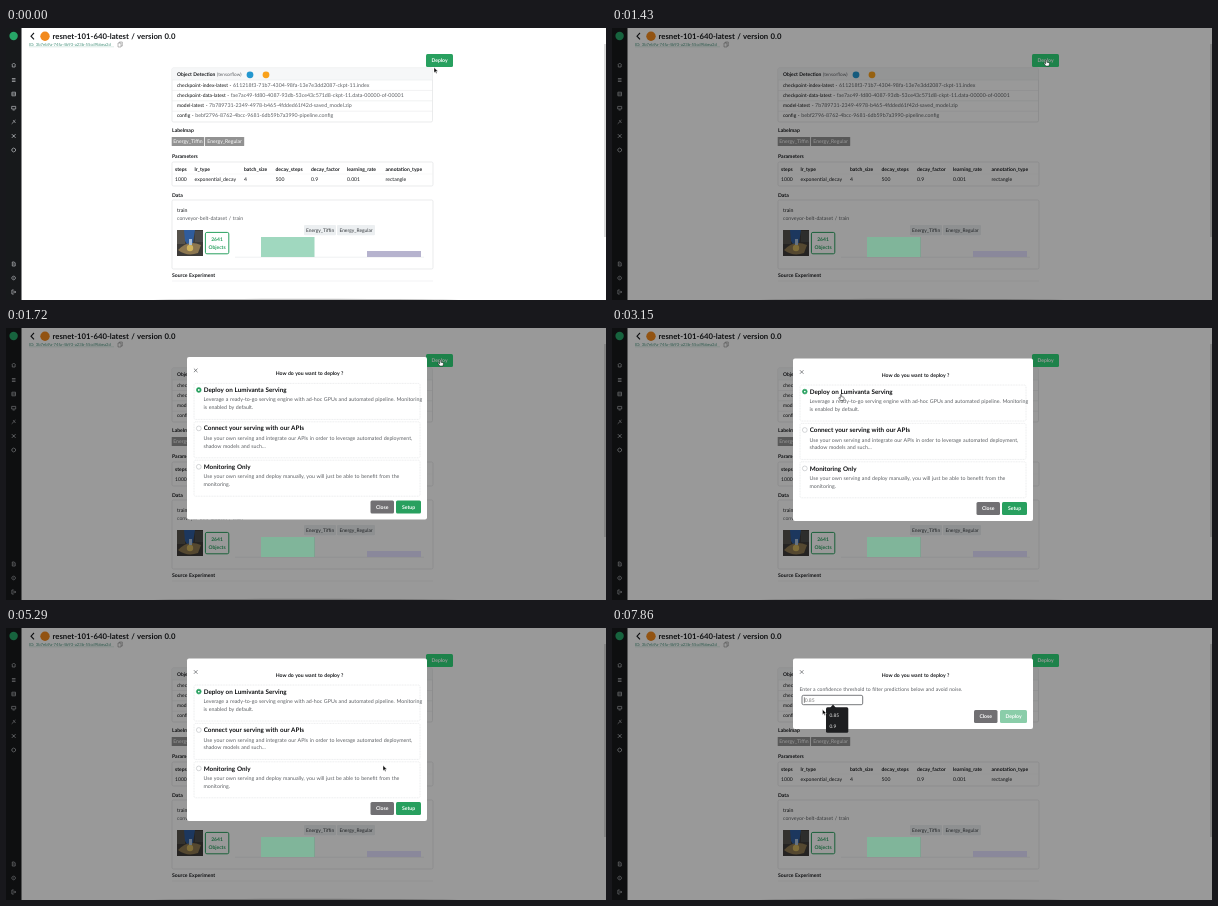
An HTML page that plays this animation: 600 px wide and 272 px high, repeating every 8000 ms.

```html
<!DOCTYPE html>
<html lang="en">
<head>
<meta charset="utf-8">
<title>Model deployment</title>
<style>
  html, body { margin: 0; width: 100%; height: 100%; overflow: hidden; background: #fff; }
  svg { display: block; width: 100vw; height: 100vh; }
  text {
    font-family: Lato, "Open Sans", sans-serif; word-spacing: .06em;
    white-space: pre; text-rendering: geometricPrecision;
  }
  .b { font-weight: 700; }
</style>
</head>
<body>
<svg id="stage" viewBox="0 0 600 272"></svg>
<script>
const GREEN = '#28a05f', DARK_GREEN = '#218a4f', PALE_GREEN = '#8acda9', VIVID_GREEN = '#30d87b';
const INK = '#16181b', GREY = '#5c5f63';
const STEPS = 56, LOOP = 8000;

const rect = (x, y, w, h, fill, more = '') =>
  `<rect x="${x}" y="${y}" width="${w}" height="${h}" fill="${fill}" ${more}/>`;
const disc = (x, y, r, fill, more = '') =>
  `<circle cx="${x}" cy="${y}" r="${r}" fill="${fill}" ${more}/>`;
const path = (d, stroke, width = .7, fill = 'none', more = '') =>
  `<path d="${d}" stroke="${stroke}" stroke-width="${width}" fill="${fill}" ${more}/>`;
const text = (x, y, size, str, fill = INK, more = '') =>
  `<text x="${x}" y="${y}" font-size="${size}" fill="${fill}" ${more}>${str}</text>`;
const bold = (x, y, size, str, fill = INK, more = '') =>
  text(x, y, size, str, fill, `class="b" ${more}`);
const group = (id, body, more = '') => `<g id="${id}" ${more}>${body}</g>`;
const card = (x, y, w, h) =>
  rect(x, y, w, h, '#fff', 'rx="1.5" stroke="#dcdee0" stroke-width=".6"');
const button = (x, y, w, label, fill, id = '') =>
  rect(x, y, w, 13, fill, `rx="1.5" ${id && `id="${id}"`}`) +
  bold(x + w / 2, y + 8.4, 5.1, label, '#fff', 'text-anchor="middle"');

function sidebar() {
  const c = '#a5a8ab';
  const icons = [
    [37, 'M-2 0L0 -2L2 0M-1.4 0V2H1.4V0'],
    [52, 'M-1.8 -1.5H1.8M-1.8 0H1.8M-1.8 1.5H1.8'],
    [66, 'M-1.8 -1.8H1.8V1.8H-1.8ZM-1.8 0H1.8'],
    [80, 'M-2 -1.6H2V1H-2ZM-1 2H1'],
    [94, 'M-2 1.8L1.8 -2M-.5 -1.8L1.8 1'],
    [108, 'M-2 -2L2 2M2 -2L-2 2M0 -1V1'],
    [122, 'M0 -2L1.8 -1V1L0 2L-1.8 1V-1Z'],
    [236, 'M-1.4 -2H.6L1.5 -1V2H-1.4ZM-.6 0H.7'],
    [250, 'M0 -1.8A1.8 1.8 0 1 1 -.1 -1.8M0 -.5V.5'],
    [264, 'M0 -2H-1.8V2H0M-.8 0H2L.8 -1.2M2 0L.8 1.2']
  ];
  return rect(0, 0, 15.5, 272, '#17191b') + disc(7.6, 8, 4.2, '#27a567') +
    icons.map(([y, d]) => path(d, c, .8, 'none', `transform="translate(7.7 ${y})"`)).join('');
}

function header() {
  return path('M28 5L25 8.2L28 11.4', INK, 1.1) + disc(39, 8.2, 4.7, '#f28a1e') +
    bold(46.5, 11, 7.75, 'resnet-101-640-latest / version 0.0') +
    text(23, 18, 4.2, 'ID: 3b7eb9a-74fa-4b93-a23b-55cd9bbea2d', '#4d9680') +
    path('M23 18.8H108', '#8dbdae', .3) +
    path('M112 15H115V19H112ZM113.3 15V14H116.3V18H115', '#777', .5);
}

function artifacts() {
  const rows = [
    ['checkpoint-index-latest', '611218f3-71b7-4304-98fa-13e7e3dd2087-ckpt-11.index'],
    ['checkpoint-data-latest', 'fae7ac49-fd80-4087-93db-53ce43c571d8-ckpt-11.data-00000-of-00001'],
    ['model-latest', '7b789731-2349-4978-b465-4fdded61f42d-saved_model.zip'],
    ['config', 'bebf2796-8762-4bcc-9681-6db59b7a3990-pipeline.config']
  ];
  return card(166, 40, 260.5, 54) + rect(166.3, 40.3, 260, 11.5, '#f6f7f8') +
    bold(171, 48, 4.95, 'Object Detection') + text(211, 48, 4.7, '(tensorflow)', GREY) +
    disc(244, 46.8, 3.4, '#2497cf') + disc(260, 46.8, 3.4, '#f9a11b') +
    rows.map(([key, value], i) => path(`M166 ${52 + i * 10.4}H426.5`, '#e2e4e6', .5) +
      text(171, 58.8 + i * 10.2, 5.3,
        `<tspan font-size="4.95" fill="#0c0d0e">${key} - </tspan>${value}`, GREY)).join('');
}

function parameters() {
  const columns = [
    [169, 'steps', '1000'], [188.5, 'lr_type', 'exponential_decay'],
    [238, 'batch_size', '4'], [269.5, 'decay_steps', '500'],
    [305, 'decay_factor', '0.9'], [341, 'learning_rate', '0.001'],
    [379.5, 'annotation_type', 'rectangle']
  ];
  return bold(166, 130, 5.1, 'Parameters') + card(166, 134, 261, 24) +
    path('M166 146H427', '#eceeef', .4) +
    columns.map(([x, name, value]) =>
      bold(x, 142.8, 5, name) + text(x, 152.8, 5.1, value)).join('');
}

function dataset() {
  const photo = rect(171, 202, 26, 26, '#3d3b38') +
    rect(171, 202, 8, 14, '#57534c') + rect(189, 203, 8, 11, '#4b4a49') +
    path('M178 202H189L187 215L183 219L179 213Z', 'none', 0, '#2f5c9c') +
    path('M172 222Q182 211 195 217L192 225Q181 229 172 222Z', 'none', 0, '#8d7750') +
    disc(184, 220, 3.2, '#d1b45d') + rect(183, 211, 3, 6, '#a8bed8');
  const chip = (x, w, label) => rect(x, 197, w, 10.2, '#eceff1', 'rx="1"') +
    text(x + w / 2, 203.8, 4.9, label, '#33373b', 'text-anchor="middle"');
  return bold(166, 168.5, 5.1, 'Data') + card(166, 172, 261, 69) +
    text(171, 184, 5.2, 'train') +
    text(171, 191.7, 5.2, 'conveyor-belt-dataset / train', GREY) + photo +
    rect(199.4, 204.4, 23.4, 21.4, '#fff', `rx="1.5" stroke="${GREEN}"`) +
    ['2641', 'Objects'].map((s, i) =>
      bold(211, 213.2 + i * 7.6, 5, s, GREEN, 'text-anchor="middle"')).join('') +
    chip(298, 32, 'Energy_Tiffin') + chip(331, 38, 'Energy_Regular') +
    path('M229 229.2H418', '#dfe1e4', .5);
}

const bars = (first, second) => rect(255, 209, 53.5, 20, first) + rect(361, 223, 54, 6, second);

function page() {
  const label = (x, w, s) => rect(x, 109, w, 9, '#929292', 'rx=".6"') +
    text(x + w / 2, 115.4, 5.1, s, '#fff', 'text-anchor="middle"');
  return sidebar() + header() + button(420, 26, 27, 'Deploy', GREEN, 'topButton') +
    artifacts() + bold(166, 104, 5.1, 'Labelmap') +
    label(165.7, 32.5, 'Energy_Tiffin') + label(199, 39.2, 'Energy_Regular') +
    parameters() + dataset() + bars('#a0d8bf', '#b6b3ce') +
    bold(166, 248.5, 5.1, 'Source Experiment') +
    path('M166 253H427', '#e4e6e8', .5) +
    rect(598.4, 16, 1.2, 193, '#c3c3c3') +
    '<ellipse cx="300" cy="272.6" rx="165" ry="1.8" opacity=".25"/>';
}

function choices() {
  const options = [
    [57, 'Deploy on Lumivanta Serving',
      'Leverage a ready-to-go serving engine with ad-hoc GPUs and automated pipeline. Monitoring',
      'is enabled by default.'],
    [95.4, 'Connect your serving with our APIs',
      'Use your own serving and integrate our APIs in order to leverage automated deployment,',
      'shadow models and such...'],
    [133.8, 'Monitoring Only',
      'Use your own serving and deploy manually, you will just be able to benefit from the',
      'monitoring.']
  ];
  return options.map(([y, name, first, second], i) =>
    rect(188, y, 226, 36, '#fff', 'rx="1.5" stroke="#d9dbdd" stroke-width=".5" stroke-dasharray="1 .6"') +
    disc(192.8, y + 6.6, 2.4, i ? '#fff' : GREEN, `stroke="${i ? '#b8bbbe' : GREEN}" stroke-width=".6"`) +
    (i ? '' : disc(192.8, y + 6.6, .9, '#fff')) +
    bold(197.7, y + 8.7, 6.3, name, '#0d0e10') +
    text(197.5, y + 18.1, 5.28, first, GREY) +
    text(197.5, y + 26, 5.28, second, GREY)).join('') +
    button(364.5, 174, 23.5, 'Close', '#717073') +
    button(390, 174, 25, 'Setup', GREEN, 'setupButton');
}

function threshold() {
  return text(187.5, 62.6, 5.1,
    'Enter a confidence threshold to filter predictions below and avoid noise.', GREY) +
    rect(190, 67.3, 60.7, 9.4, '#fff', 'id="field" rx="1.5"') +
    text(192.7, 73.8, 5, '0.85', '#444', 'id="value"') +
    group('caret', path('M192.4 69.3V74.8', '#111', .5)) +
    button(362, 82, 23.5, 'Close', '#717073') +
    button(388, 82, 27, 'Deploy', DARK_GREEN, 'deployButton');
}

function suggestions() {
  return path('M218 80L221 76.5L224 80Z', 'none', 0, '#1d1e20') +
    rect(214, 79.3, 22.3, 25.5, '#1d1e20', 'rx="1.5"') +
    text(217.5, 88.9, 4.8, '0.85', '#f2f2f2') + text(217.5, 100, 4.8, '0.9', '#f2f2f2');
}

const ARROW = path('M0 0V5.2L1.3 4.1L2.1 5.9L3 5.5L2.2 3.8H3.9Z', '#fff', .4, '#080808');
const HAND = path('M-.6 .2Q0 -.5 .6 .2V2.2L2.7 2.7Q3.4 3 3.2 3.9L2.6 6H-.5L-2.3 3.6Q-2.2 2.7 -1.4 3.1L-.6 3.8Z',
  '#111', .5, '#fff');

const stage = document.getElementById('stage');
stage.innerHTML = page() +
  group('shade', rect(0, 0, 600, 272, '#000', 'opacity=".4"') + bars('#80b59a', '#8a889b')) +
  group('modal',
    rect(181, 30.5, 240, 162.5, '#fff', 'id="sheet" rx="2"') +
    path('M187.9 42.2L191.5 45.8M191.5 42.2L187.9 45.8', '#55585c', .7) +
    bold(269.7, 48.7, 5.1, 'How do you want to deploy ?') +
    group('choices', choices()) + group('threshold', threshold())) +
  group('suggestions', suggestions()) +
  group('cursor', group('arrow', ARROW) + group('hand', HAND));

const el = id => document.getElementById(id);
const show = (id, on) => el(id).setAttribute('visibility', on ? 'inherit' : 'hidden');
const set = (id, attrs) => Object.entries(attrs).forEach(([k, v]) => el(id).setAttribute(k, v));

// Events and cursor stops, counted in screen refreshes.
const HOVER = 3, DIM = 10, OPEN = 11, NEXT = 42, FOCUS = 51, CLEAR = 53;
const STOPS = [
  [0, 428, 39.5], [4, 434.3, 32], [13, 434.3, 32], [18, 262, 84], [22, 229, 66.5],
  [25, 226, 71], [30, 252, 108], [34, 270, 137], [37, 377, 137.5], [39, 401.5, 177.5],
  [43, 401.5, 177.5], [49, 222, 76], [51, 210.5, 81.5], [56, 210.5, 81.5]
];
const HAND_SPANS = [[HOVER, 13], [20, 26], [39, NEXT]];

function cursorAt(step) {
  const i = Math.max(1, STOPS.findIndex(stop => stop[0] >= step));
  const [t0, x0, y0] = STOPS[i - 1], [t1, x1, y1] = STOPS[i];
  const p = (step - t0) / (t1 - t0), e = p * p * (3 - 2 * p);
  return [x0 + (x1 - x0) * e, y0 + (y1 - y0) * e];
}

function draw(step) {
  const second = step >= NEXT, empty = step >= CLEAR, focused = step >= FOCUS;
  const dimmed = step >= DIM;
  show('shade', dimmed);
  set('topButton', { fill: dimmed ? VIVID_GREEN : step >= HOVER ? DARK_GREEN : GREEN });

  show('modal', step >= OPEN);
  const rise = step === OPEN ? -9 : step === OPEN + 1 ? -1.6 : 0;
  set('modal', { transform: `translate(0 ${rise})`, opacity: step === OPEN ? .6 : 1 });
  set('sheet', { height: second ? 70.5 : 162.5 });
  show('choices', step >= OPEN && !second);
  show('threshold', second);
  set('setupButton', { fill: step >= 39 ? DARK_GREEN : GREEN });

  set('field', { stroke: focused ? '#4a4d51' : '#777b80', 'stroke-width': focused ? .75 : .6 });
  set('value', { fill: empty ? '#777' : '#444' });
  set('deployButton', { fill: empty ? PALE_GREEN : DARK_GREEN });
  show('caret', focused);
  show('suggestions', empty);

  const hand = HAND_SPANS.some(([from, to]) => step >= from && step < to);
  const [x, y] = cursorAt(step);
  set('cursor', { transform: `translate(${x} ${y})` });
  show('hand', hand);
  show('arrow', !hand);
}

const start = performance.now();
function tick() {
  const t = (performance.now() - start) % LOOP;
  draw(Math.floor(t / LOOP * STEPS));
  requestAnimationFrame(tick);
}
tick();
</script>
</body>
</html>
```
